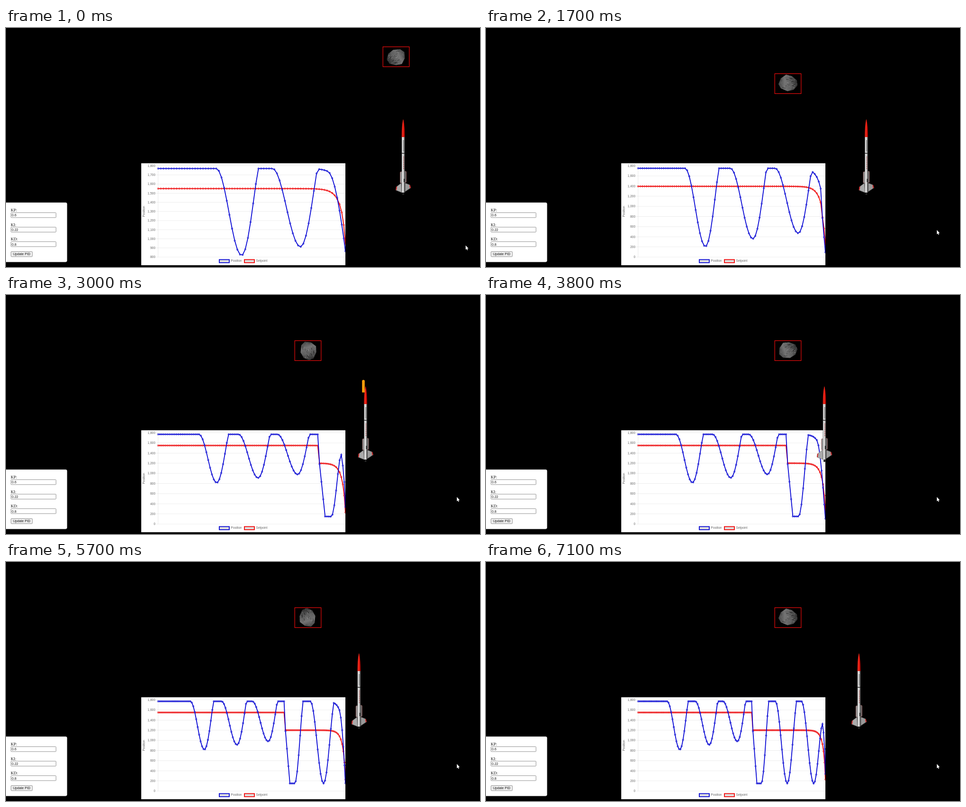
An HTML page with a canvas for the animation above (7.2 s loop, 1000 by 504 pixels).

```html
<!DOCTYPE html>
<html lang="en">
<head>
<meta charset="utf-8">
<title>PID rocket</title>
<style>
  html, body { margin: 0; width: 100%; height: 100%; overflow: hidden; background: #000; }
  canvas { display: block; }
</style>
</head>
<body>
<canvas id="stage" width="1000" height="504"></canvas>
<script>
const c = document.getElementById('stage').getContext('2d');
const LOOP = 7200, STEP = 100;
const SANS = '"Liberation Sans", Arial, sans-serif';
const SERIF = '"Liberation Serif", Times, serif';
const BLUE = '#0606d4', RED = '#f20505';

// Chart geometry and the share of an eased move left after each update
const LEFT = 321, RIGHT = 716, TOP = 290.6, BASE = 483, REST = 0.656;
const FIRST = 72, JUMP = 87, RESCALE = 1640;
const MAX = 1770, MIN = 150;

// Swings of the position: [start, bottom, lowest value]
const swings = [
  [22, 31.6, 818], [43.3, 53.9, 912], [64.3, 75.2, 980],
  [86, 93.3, MIN], [104, 113, MIN], [123.8, 133.1, MIN]
];
// Turning points of the rocket: [time, x]
const flight = [
  [0, 838], [650, 485], [1400, 905], [1550, 905], [2225, 28], [2500, 28], [3100, 811],
  [3592, 811], [4500, 28], [4550, 28], [5030, 811], [5538, 811], [6400, 28], [6500, 28], [7176, 811]
];
// [start, x] of each shot
const shots = [[1200, 823], [3000, 754], [4050, 640]];

const wave = u => (1 - Math.cos(Math.PI * u)) / 2;
const clamp = (v, lo, hi) => Math.min(hi, Math.max(lo, v));
const setpoint = i => i < JUMP ? 1550 : 1200;

function position(i) {
  const [start, bottom, low] = swings.findLast(s => i >= s[0]) || [i, i + 1, 0];
  const u = (i - bottom) / (bottom - start);
  if (start === JUMP - 1 && u < 0) return i < JUMP ? MAX : Math.max(MIN, 1180 - 345 * (i - JUMP));
  if (u >= 1) return MAX;
  // The way up is steeper than the way down and stops at the edge
  const lift = u < 0 ? MAX - low : low > MIN ? 1310 : 1850;
  return Math.min(MAX, low + lift * wave(u));
}

function rocketX(t) {
  const i = flight.findIndex(k => k[0] > t);
  const [t0, a] = flight[i - 1], [t1, b] = flight[i];
  return a + (b - a) * wave((t - t0) / (t1 - t0));
}

function text(s, x, y, size, color = '#666', align = 'left', family = SANS) {
  c.font = size + 'px ' + family;
  c.fillStyle = color;
  c.textAlign = align;
  c.fillText(s, x, y);
}

function box(x, y, w, h, fill, stroke, line = 1, r = 0) {
  c.beginPath();
  c.roundRect(x, y, w, h, r);
  if (fill) { c.fillStyle = fill; c.fill(); }
  if (stroke) { c.strokeStyle = stroke; c.lineWidth = line; c.stroke(); }
}

function poly(points, fill, stroke) {
  c.beginPath();
  points.forEach(p => c.lineTo(p[0], p[1]));
  c.closePath();
  c.fillStyle = fill;
  c.fill();
  if (stroke) { c.strokeStyle = stroke; c.lineWidth = 0.7; c.stroke(); }
}

function shade(x0, x1, ...colors) {
  const g = c.createLinearGradient(x0, 0, x1, 0);
  colors.forEach((k, i) => g.addColorStop(i / (colors.length - 1), k));
  return g;
}

function panel() {
  box(-4, 368.3, 132.7, 125, '#fff', '#ddd', 0.7, 3);
  [['KP:', 0.6], ['KI:', 0.22], ['KD:', 0.8]].forEach(([name, value], i) => {
    const y = 387 + i * 30.6;
    text(name, 10, y, 8.5, '#111', 'left', SERIF);
    box(10.5, y + 2.4, 95, 10.4, '#fff', '#767676', 0.8, 1);
    text(value, 12, y + 10.3, 7.1, '#111');
  });
  box(10.5, 471.4, 45.2, 10.8, '#efefef', '#767676', 0.8, 1.5);
  text('Update PID', 33, 479.4, 7.1, '#111', 'center');
}

function series(value, color, t) {
  const last = FIRST + t / STEP;
  const old = t < RESCALE ? 1 : REST ** ((t - RESCALE) / STEP);
  const points = [];
  for (let i = 0; i <= last; i++) {
    const age = last - i, v = value(i);
    const x = LEFT + (RIGHT - LEFT) * i / last * (1 + 1.1 * (1 - REST ** age) / last);
    const wide = BASE - v * (BASE - TOP) / 1800;
    const tight = BASE - (v - 800) * (BASE - TOP) / 1000;
    const y = i >= JUMP && t >= RESCALE ? wide : wide + (tight - wide) * old;
    points.push([x, y + (BASE - y) * REST ** (age + 0.5)]);
  }
  c.strokeStyle = color;
  c.lineWidth = 1.8;
  c.beginPath();
  points.forEach(p => c.lineTo(p[0], p[1]));
  c.stroke();
  c.fillStyle = 'rgba(215,215,235,.35)';
  c.lineWidth = 1;
  for (const [x, y] of points) {
    c.beginPath();
    c.arc(x, y, 1.5, 0, 7);
    c.fill();
    c.stroke();
  }
}

function legend(x, name, color) {
  box(x + 1, 488.3, 21, 6.6, '#ddd', color, 1.8);
  text(name, x + 25.6, 493.4, 6.5);
}

function chart(t) {
  c.save();
  c.beginPath();
  c.rect(285.3, 285.3, 430.7, 215);
  c.clip();
  c.fillStyle = '#fff';
  c.fillRect(285, 285, 431, 216);
  const [low, gap] = t < RESCALE ? [800, 100] : [0, 200];
  for (let v = low; v <= 1800; v += gap) {
    const y = BASE - (v - low) / (1800 - low) * (BASE - TOP);
    c.fillStyle = '#e6e6e6';
    c.fillRect(316.5, y - 0.3, RIGHT - 316.5, 0.7);
    text(v.toLocaleString('en-US'), 315, y + 2.3, 6.5, '#666', 'right');
  }
  c.fillStyle = '#e0e0e0';
  c.fillRect(LEFT - 0.4, TOP, 0.7, BASE - TOP);
  c.save();
  c.translate(293.3, 387);
  c.rotate(-Math.PI / 2);
  text('Position', 0, 0, 6.5, '#666', 'center');
  c.restore();
  series(setpoint, RED, t);
  series(position, BLUE, t);
  legend(449, 'Position', BLUE);
  legend(502, 'Setpoint', RED);
  c.restore();
}

function asteroid(t) {
  const [x, y] = t < 1500 ? [823, 60.7] : [637, 117.3];
  c.save();
  c.translate(x, y);
  c.rotate((t - 7100) / STEP * Math.PI / 5.4);
  c.translate(0, -2);
  poly([[-20, 3], [-15, -9], [-4, -17], [8, -14], [19, -5], [20, 6], [12, 15], [-1, 18], [-15, 12]],
    shade(-20, 20, '#444', '#747474', '#5c5c5c', '#2c2c2c'));
  c.clip();
  let seed = 7;
  const rnd = () => (seed = seed * 16807 % 2147483647) / 2147483647;
  for (let i = 0; i < 90; i++) {
    const g = 20 + rnd() * 130 | 0;
    c.fillStyle = `rgba(${g},${g},${g},.55)`;
    c.fillRect(rnd() * 40 - 20, rnd() * 36 - 18, 1 + rnd() * 4, 0.8 + rnd() * 1.5);
  }
  c.restore();
  box(x - 27.8, y - 21, 55.6, 42, null, '#e80c0c', 1.2);
}

function rocket(x) {
  c.save();
  c.translate(x, 0);
  // Fins
  poly([[-4, 327], [-14.5, 335], [-15.5, 342], [-3, 347]], '#aaa', '#666');
  poly([[4, 327], [14, 331], [16, 337], [4, 345]], '#999', '#666');
  poly([[-15, 335], [-13, 334], [-14, 342], [-15.7, 342]], '#c22');
  poly([[13, 331], [14.5, 331], [16, 337], [14, 338]], '#c22');
  // Side pods
  box(-6.5, 303, 4, 24, '#999', '#a66', 0.7, 2);
  box(2.5, 302, 4, 24, '#666', '#a66', 0.7, 2);
  // Body
  c.fillStyle = shade(-3.5, 3.5, '#555', '#e8e8e8', '#ddd', '#999', '#333');
  c.fillRect(-3.3, 229, 6.6, 118);
  c.fillStyle = '#222';
  c.fillRect(-3.3, 263.5, 6.6, 1.5);
  c.fillRect(1, 318, 2, 7);
  c.fillRect(-1.8, 347, 3.6, 5);
  c.fillStyle = 'rgba(60,60,60,.6)';
  for (let y = 237; y < 260; y += 3) c.fillRect(-0.5, y, 2.5, 2);
  c.fillStyle = 'rgba(150,50,50,.6)';
  for (let y = 271; y < 297; y += 4) c.fillRect(0, y, 2, 2.6);
  // Nose
  c.beginPath();
  c.moveTo(-0.4, 193);
  c.quadraticCurveTo(-3.4, 208, -3.7, 230);
  c.lineTo(3.7, 230);
  c.quadraticCurveTo(3.4, 208, 0.4, 193);
  c.fillStyle = shade(-3.7, 3.7, '#800000', '#f03020', '#e01008', '#600');
  c.fill();
  c.restore();
}

function cursor(t) {
  const e = wave(clamp((t - 100) / 600, 0, 1));
  c.save();
  c.translate(969.7 - 18.5 * e, 458.5 - 32.5 * e);
  poly([[0, 0], [0, 9], [2, 7.2], [3.3, 10.3], [4.7, 9.6], [3.4, 6.7], [6, 6.4]], '#fff');
  c.restore();
}

function draw(t) {
  c.fillStyle = '#000';
  c.fillRect(0, 0, 1000, 504);
  panel();
  chart(t);
  asteroid(t);
  rocket(rocketX(t));
  for (const [start, x] of shots) {
    const y = 179 - (t - start) * 0.49;
    if (t >= start && y > -27) box(x - 2.8, y, 5.6, 26.5, '#ff9d0a', null, 0, [2.5, 2.5, 0, 0]);
  }
  cursor(t);
}

function tick(now) {
  draw(Math.floor(now % LOOP / STEP) * STEP);
  requestAnimationFrame(tick);
}
requestAnimationFrame(tick);
</script>
</body>
</html>
```
